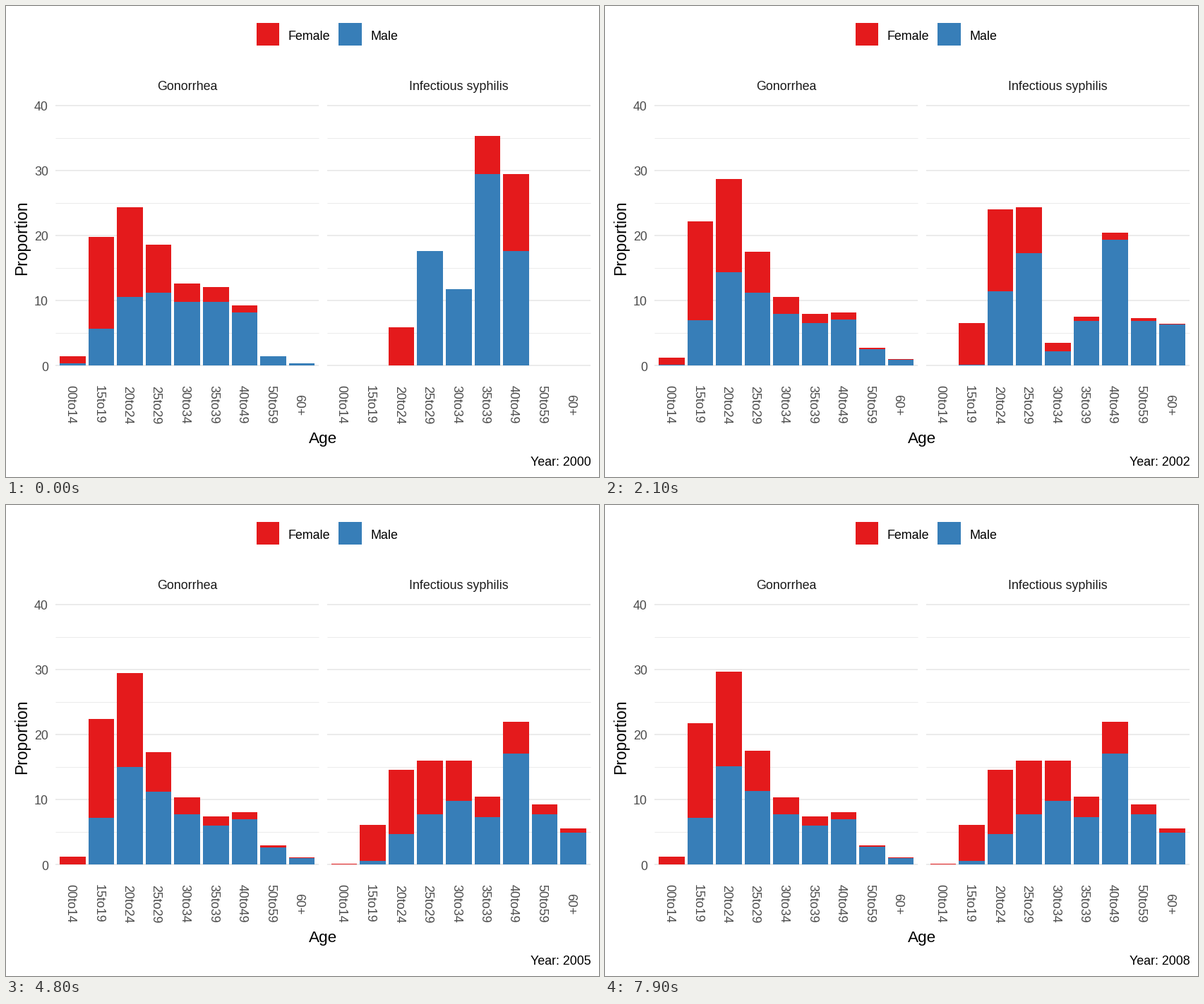
Recreate the animation shown at these times as a matplotlib script. Size 840 by 667 pixels, loop 8000 ms.

```python
import numpy as np
import matplotlib.pyplot as plt
from matplotlib.animation import FuncAnimation
from matplotlib.patches import Rectangle

W, H, DPI = 840, 667, 100
FRAMES, STEP = 80, 199 / 21          # frames per year
YEARS = np.arange(10)                # counted from 2000
RED, BLUE = "#E41A1C", "#377EB8"
GREY, GRID = "#4D4D4D", "#EBEBEB"
BASE_Y, UNIT = 509.3, 9.22           # zero line and pixels per percent
PANEL_W = 373.4
SLOT = PANEL_W / 9.2
PANELS = {"Gonorrhea": 70, "Infectious syphilis": 454.6}
AGES = ["00to14", "15to19", "20to24", "25to29", "30to34",
        "35to39", "40to49", "50to59", "60+"]
AGE = np.arange(len(AGES))


def split(total, top, decay, whole=False):
    """Male and female parts; the female share falls off with age."""
    female = np.array(total) * np.minimum(1, top * np.exp(-decay * AGE))
    if whole:
        female = np.round(female)
    return np.array([total - female, female])


def gonorrhea(year):
    """Settles from the first profile, with a dip in young women around 2007."""
    first = np.array([[.4, 5.7, 10.6, 11.2, 9.8, 9.8, 8.2, 1.5, .4],
                      [1.1, 14.1, 13.8, 7.5, 2.9, 2.3, 1.1, 0, 0]])
    settled = split([1.2, 22.9, 29.8, 17.5, 10.4, 7.4, 8.1, 3, 1.1], .95, .33)
    now = settled + (first - settled) * np.exp(-.9 * year)
    now[1, 1] -= 4.2 * np.exp(-(year - 7) ** 2)
    return now


def syphilis(year):
    """A few cases at first, then a three-year swing between two profiles."""
    if year == 0:
        return np.array([[0, 0, 0, 3, 2, 5, 3, 0, 0],
                         [0, 0, 1, 0, 0, 1, 2, 0, 0]])
    if year == 1:
        return split([0, 3, 9, 3, 1, 1, 2, 3, 1], 1.82, .6, whole=True)
    if year == 2:
        return split([0, 1, 4, 4, 0, 1, 3, 1, 1], 1.82, .6, whole=True)
    older = np.array([.4, 4.6, 11.7, 12.4, 12, 14.6, 24.6, 13.5, 6.2])
    younger = np.array([.1, 6.1, 14.6, 16, 16, 10.4, 21.9, 9.3, 5.6])
    swing = (1 - np.cos(2 * np.pi * (year - 4) / 3)) / 1.5
    return split(older + (younger - older) * swing, 1.19, .28)


def percent(v):
    return 100 * v / v.sum()


# indexed by year, panel, sex, age
data = np.array([[percent(gonorrhea(y)), percent(syphilis(y))] for y in YEARS])
keys = np.round(YEARS * STEP)

plt.rcParams["font.family"] = "Liberation Sans"
fig = plt.figure(figsize=(W / DPI, H / DPI), dpi=DPI, facecolor="white")
ax = fig.add_axes([0, 0, 1, 1])
ax.set(xlim=(0, W), ylim=(H, 0))
ax.axis("off")


def label(x, y, s, px=17.9, color="black", ha="center", rotation=0):
    return ax.text(x, y, s, fontsize=px * 72 / DPI, color=color, ha=ha,
                   va="baseline", rotation=rotation, rotation_mode="anchor")


def box(x, y, w, h, color):
    return ax.add_patch(Rectangle((x, y), w, h, fc=color, lw=0, zorder=3))


for x, name, color in [(354.7, "Female", RED), (471.3, "Male", BLUE)]:
    box(x, 24, 32.5, 32, color)
    label(x + 45, 47.5, name, ha="left")

bars = []
for title, left in PANELS.items():
    label(left + PANEL_W / 2, 118.6, title, color="#1A1A1A")
    for v in range(0, 41, 5):
        y = BASE_Y - v * UNIT
        ax.plot([left, left + PANEL_W], [y, y], color=GRID, solid_capstyle="butt",
                lw=(1 if v % 10 else 2) * 72 / DPI, zorder=1)
    centers = left + SLOT * (.6 + AGE)
    for cx, age in zip(centers, AGES):
        label(cx - 8.5, 564.7, age, color=GREY, rotation=-90)
    bars.append([[box(cx - .45 * SLOT, BASE_Y, .9 * SLOT, 0, c) for cx in centers]
                 for c in (BLUE, RED)])

for v in range(0, 41, 10):
    label(60, BASE_Y - v * UNIT + 7.4, str(v), color=GREY, ha="right")
label(448.8, 619.5, "Age", px=22.5)
label(29, 328, "Proportion", px=22.9, rotation=90)
year_text = label(828.4, 651, "", ha="right")


def update(i):
    k = np.searchsorted(keys, i, side="right") - 1
    t = (i - keys[k]) / (keys[k + 1] - keys[k])
    now = data[k] + t * (data[k + 1] - data[k])
    for panel, values in zip(bars, now):
        tops = BASE_Y - UNIT * np.cumsum(values, axis=0)
        floors = np.vstack([np.full(len(AGES), BASE_Y), tops[:-1]])
        for row, top, floor in zip(panel, tops, floors):
            for bar, y, y0 in zip(row, top, floor):
                bar.set_y(y)
                bar.set_height(y0 - y)
    year_text.set_text(f"Year: {2000 + round(i / STEP)}")
    return [year_text]


anim = FuncAnimation(fig, update, frames=FRAMES, interval=100,
                     repeat=True, repeat_delay=0, blit=False)
plt.show()
```
